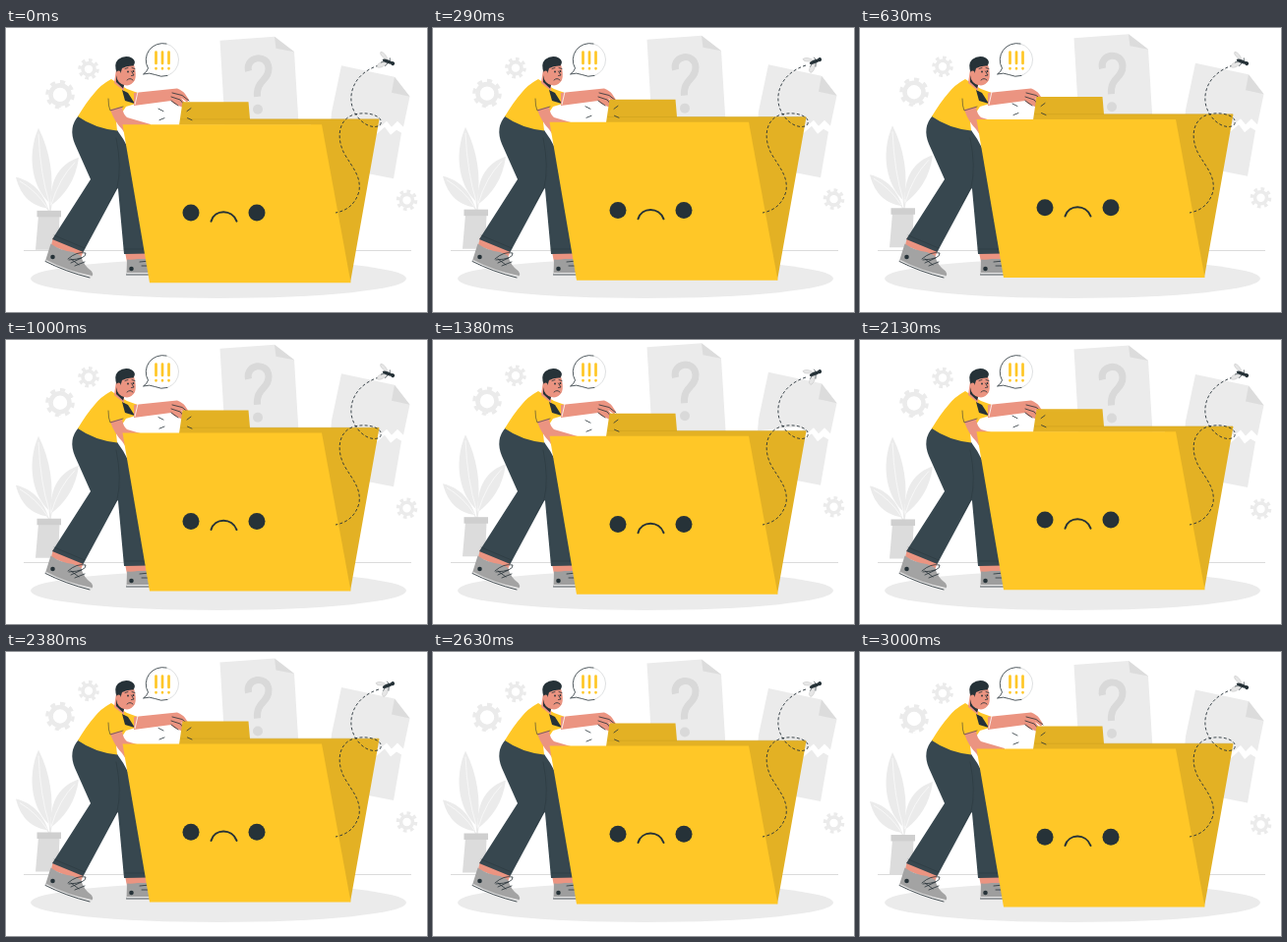
Animation of 428x289 px, one loop 3040 ms. Source, as an HTML page:

```html
<!DOCTYPE html>
<html lang="en">
<head>
<meta charset="utf-8">
<title>Sad folder</title>
<style>
  html, body { margin: 0; width: 100%; height: 100%; overflow: hidden; background: #fff; }
  svg { display: block; width: 428px; height: 289px; }
  .pale { fill: #ebebeb; }
  .grey { fill: #dcdcdc; }
  .gold { fill: #ffc727; }
  .shade { fill: #e3b124; }
  .ink { fill: #263238; }
  .skin { fill: #eb9481; }
  .cloth { fill: #37474f; }
  .line { fill: none; stroke: #263238; stroke-width: .8; stroke-linecap: round; stroke-linejoin: round; }
  .vein { fill: none; stroke: #fff; stroke-width: .6; }
</style>
</head>
<body>
<svg viewBox="0 0 428 289">
  <ellipse class="pale" cx="216" cy="255" rx="191" ry="20"/>
  <path d="M18 226.5H412" stroke="#d2d2d2" stroke-width=".8"/>

  <!-- backdrop at its lowest point -->
  <g id="backdrop">
    <g id="gears" fill="none" stroke="#ebebeb"></g>

    <!-- plant -->
    <path class="pale" d="M44 178C28 164 20 132 33 102C45 126 49 152 45 178Z"/>
    <path class="pale" d="M45.500 181C44 153 56 138 74 132C71 155 60 170 45.500 181Z"/>
    <path class="pale" d="M43 184C23 181 14 168 10 152C28 156 38 169 43 184Z"/>
    <path d="M44 176L45 187M46 180L45 187M41 182L44 187" stroke="#ebebeb" stroke-width="1.200"/>
    <path class="vein" d="M33 108Q35 150 44 178M70 137Q54 153 46 180M14 156Q31 166 42 183"/>
    <path class="grey" d="M33 191H54.500L53 226H30Z"/>
    <path fill="#cfcfcf" d="M31.500 186H56V192.500H31.500Z"/>

    <!-- question sheet -->
    <path class="pale" d="M217.500 13L273 9L293 24.500L298 106H223Z"/>
    <path class="grey" d="M273 9L293 24.500L274.500 21Z"/>
    <path d="M246.500 44C243 29 266 25.500 267 41C267.500 54 254 53 255.500 70" fill="none" stroke="#d9d9d9" stroke-width="7"/>
    <circle cx="256" cy="83" r="5" fill="#d9d9d9"/>

    <!-- torn sheet -->
    <path class="pale" d="M341 38.500L395 50L410.500 70L404 101L398 95L392 101L387 95L380 101L372 94L330 98L331 86Z"/>
    <path class="grey" d="M395 50L410.500 70L392 66Z"/>
    <path class="pale" d="M402 107L394 153.500L366 148L360 105L377 108L385 101L391 109L397 104Z"/>
  </g>

  <!-- man -->
  <g>
    <path class="skin" d="M121 228L145 228L146 238H123Z"/>
    <path fill="#9e9e9e" d="M123 235.500Q128 236 134 235L148 235V251H122.500Z"/>
    <path fill="#e6e6e6" d="M122.500 249H148V251H122.500Z"/>
    <circle class="ink" cx="127.500" cy="245" r="2.300"/>
    <path class="line" d="M122.500 251H148M136 238L146 237M138 242H147"/>

    <path class="skin" d="M48 213L79 226L76 234L46 221Z"/>
    <path fill="#a3a3a3" d="M45.500 219.500Q56 227 68 228L76 231.500Q79 242 87 247.500Q90 252 85 254Q62 248 40 237Z"/>
    <path fill="#e6e6e6" d="M41 236Q61 247 87 252Q87 254 85 254Q61 248 40 237.500Z"/>
    <path class="line" d="M40 237.500Q61 248 85 254M63 235Q72 227 81 229Q82 235 64 236M66 239L77 234M70 242L80 238M66 235L74 241"/>
    <circle class="ink" cx="47.500" cy="233" r="2.300"/>

    <path class="cloth" d="M82 93L113 104Q126 121 131 142L145 229.500L120 230L114 164L96 140Z"/>
    <path class="cloth" d="M74 89L113 104Q120 139 114 162L78.500 228L47 215L86 154L70 118Q63 101 74 89Z"/>
    <path class="line" d="M112 112Q118 141 113 162L104 178M49 211L80 224M120 225L143 225" stroke-opacity=".5"/>

    <path class="gold" d="M107 52Q116 58 123 62L134 66L132 77L122 80L112 95L113 104.500Q90 102 73 90Q82 75 90 66Q96 58 107 52Z"/>
    <path class="skin" d="M106 83L118 80Q119 88 123 91L147 98L146 109H122L118 103Q110 95 106 83Z"/>
    <path class="line" d="M104 72Q104 80 106 84L119 80" stroke-opacity=".7"/>
    <path class="ink" d="M118 63L124 66L131 77L121 74Z"/>

    <path class="skin" d="M130 66L164 62.500L174 61.500Q180 64 182 67L186 73L184 75.500L178 71L183 78L180 81L171 77L168 74L130 79Z"/>
    <path class="line" d="M169 66L179 68.500L186 74M168 70L177 73L182 79M168 74L175 79" stroke-width=".6"/>
    <path d="M134 65L131 78" stroke="#fff" stroke-width=".8"/>

    <path class="skin" d="M112 42L130 37Q133 47 131 53Q127 60 120 58L120 64L110 56Z"/>
    <path class="ink" d="M112 48Q113 56 120 58L119 61.500L112 55Z"/>
    <path class="ink" d="M113 46Q109 37 114 32Q121 27 128 30.500Q133 34 129.500 38.500Q123 38 118 41L116.500 46Z"/>
    <ellipse class="skin" cx="114.500" cy="46.500" rx="2.200" ry="3"/>
    <path class="line" d="M121 41.500L124 40.500M128 40.500L131 41.500M127.500 44L130 48L127.500 48.500M123 53Q126 50 129 53" stroke-width=".6"/>
    <circle class="ink" cx="124" cy="44.500" r=".9"/>
    <circle class="ink" cx="129.500" cy="44" r=".9"/>
  </g>

  <!-- speech bubble: its outline thins out on the right -->
  <path class="line" d="M163 16A17 17 0 0 0 144.500 41Q143 45 139.500 47Q146 45 151.500 47.500A17 17 0 0 0 164 48.500"/>
  <path class="line" stroke-opacity=".3" d="M163 16A17 17 0 0 1 164 48.500" style="stroke-width:.5"/>
  <path d="M152.500 24.500V36M159 24.500V36M165.500 24.500V36M152.500 41.200V41.300M159 41.200V41.300M165.500 41.200V41.300"
        stroke="#ffc727" stroke-width="2.700" stroke-linecap="round"/>

  <!-- folder at its lowest point -->
  <g id="folder">
    <path class="shade" d="M176 99L179.500 75.500H246.500L248 93.200H379.500L350 259.500L310 200V99Z"/>
    <path d="M177 93.200H379" stroke="#c99c1c" stroke-width=".5"/>
    <path class="gold" d="M118.500 98.500H321L350.500 259.500H146Z"/>
    <circle class="ink" cx="188" cy="188.300" r="8.500"/>
    <circle class="ink" cx="255" cy="188.300" r="8.500"/>
    <path class="line" style="stroke-width:2" d="M208.500 197C212 184.500 230 184.500 234.500 197"/>
    <path class="line" d="M155 82.500L160 85M156 94L161 92M184 85L188 82M184.500 92L189 94"/>
  </g>

  <!-- flight trail -->
  <path class="line" stroke-dasharray="3 2.200" style="stroke-linecap:butt;stroke-width:.9" d="M379 38C354 46 348 66 352 80C357 96 372 104 380 99C386 91 370 84 354 88C337 93 336 113 344 128C353 143 361 151 359 166C355 180 346 186 335 188"/>

  <!-- fly, centred on its body -->
  <g id="fly">
    <g fill="#e6e6e6" stroke="#c4c4c4" stroke-width=".5">
      <path d="M0 -1Q-11 -3 -10 -7Q-5 -8 0 -1Z"/>
      <path d="M0 1Q-11 4 -8 9Q-3 9 0 1Z"/>
    </g>
    <ellipse class="ink" cx="0" cy="0" rx="5.500" ry="1.700"/>
    <circle class="ink" cx="5.500" cy="0" r="2"/>
    <path class="line" d="M-2 0L-6 3M1 1L-1 5M2 -1L1 -4" style="stroke-width:.6"/>
  </g>
</svg>
<script>
  const LOOP = 3040, RISE = 6.2, BUZZ = 300;
  const el = id => document.getElementById(id);
  const place = (id, transform) => el(id).setAttribute('transform', transform);

  function gear(x, y, r, width) {
    const ring = (radius, stroke, extra = '') =>
      `<circle cx="${x}" cy="${y}" r="${radius}" stroke-width="${stroke}" ${extra}/>`;
    return ring(r, width) +
      ring(r + width / 2 + 1.3, 3.4, 'pathLength="16" stroke-dasharray="1 1"');
  }
  el('gears').innerHTML =
    gear(55, 68, 9.5, 4.6) + gear(84, 42, 6, 3.6) + gear(407.5, 175.5, 6, 3.6);

  // Steady rise and fall: 0 at the ends of a period, RISE in the middle
  function lift(t, period) {
    const phase = (t + 40) % period / period;
    return RISE * (1 - Math.abs(2 * phase - 1));
  }

  const start = performance.now();
  function draw() {
    const t = (performance.now() - start) % LOOP;
    const tilt = t % BUZZ < BUZZ / 2 ? 20 : -22;
    place('backdrop', `translate(0 ${-lift(t, LOOP)})`);
    place('folder', `translate(0 ${-lift(t, LOOP / 2)})`);
    place('fly', `translate(388 34.2) rotate(${tilt})`);
    requestAnimationFrame(draw);
  }
  draw();
</script>
</body>
</html>
```
